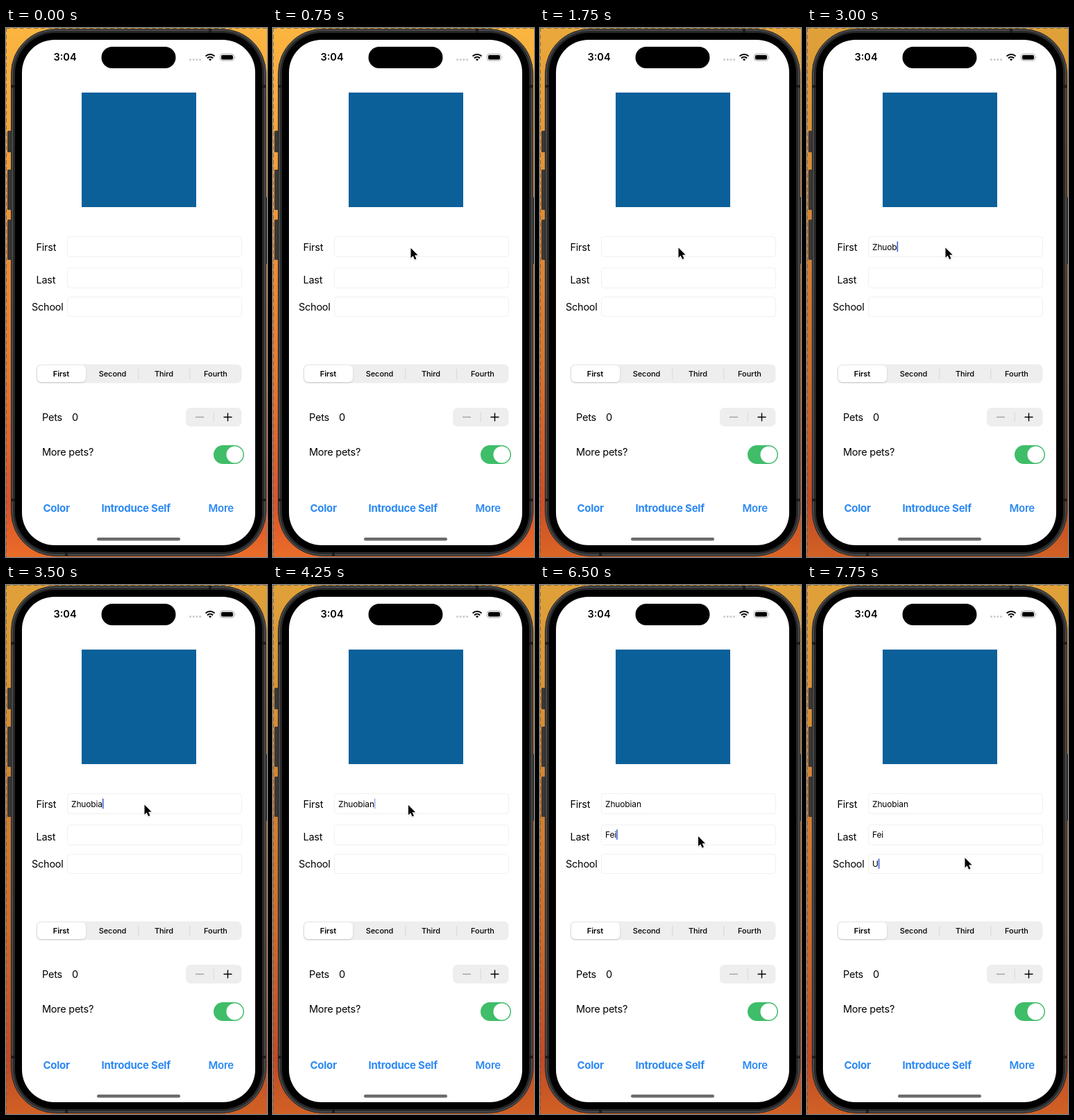
Recreate the animation shown at these times as an HTML page. Size 376 by 762 pixels, loop 8 s.

```html
<!DOCTYPE html>
<html lang="en">
<head>
<meta charset="utf-8">
<title>Phone form</title>
<style>
html, body { margin: 0; width: 100%; height: 100%; overflow: hidden; background: #000; }
svg { display: block; width: 376px; height: 762px; }
text { font-family: Inter, Roboto, sans-serif; font-size: 14.5px; letter-spacing: -.25px; fill: #000; }
.entry { font-size: 12px; letter-spacing: -.15px; }
.tab { font-size: 11px; font-weight: 500; letter-spacing: -.05px; text-anchor: middle; }
.link { font-size: 15px; font-weight: 700; fill: #2c89f3; }
.field { fill: #fff; stroke: #f0f0f0; }
.tray { fill: #eeeeef; }
.split { stroke: #d7d7d9; }
#dim { animation: dim 8s linear infinite; }
@keyframes dim {
  0%, 16% { opacity: 0; }
  26%, 100% { opacity: .11; }
}
</style>
</head>
<body>
<svg viewBox="0 0 376 762">
  <defs>
    <linearGradient id="sky" x2="0" y2="1">
      <stop offset="0" stop-color="#fbb540"/>
      <stop offset=".3" stop-color="#ee9a3c"/>
      <stop offset=".65" stop-color="#e47a31"/>
      <stop offset=".9" stop-color="#d9532a"/>
      <stop offset="1" stop-color="#ea6d29"/>
    </linearGradient>
    <filter id="soft" x="-20%" y="-20%" width="140%" height="150%">
      <feDropShadow dx="0" dy="1" stdDeviation="1.2" flood-opacity=".18"/>
    </filter>
  </defs>

  <rect width="376" height="762" fill="url(#sky)"/>
  <rect id="dim" width="376" height="762"/>
  <path d="M0 .5H376M.5 0V762" fill="none" stroke="#54483c" stroke-opacity=".6" stroke-dasharray="6 4"/>

  <!-- case -->
  <g fill="#3b3836">
    <rect x="2" y="148" width="7" height="31" rx="1.5"/>
    <rect x="2" y="204" width="7" height="58" rx="1.5"/>
    <rect x="2" y="276" width="7" height="58" rx="1.5"/>
    <rect x="372" y="243" width="4" height="97" rx="1.5"/>
  </g>
  <rect x="7.5" y="1.5" width="367" height="759" rx="64" fill="#4a4a4b" stroke="#222"/>
  <rect x="10" y="4" width="362" height="754" rx="61" fill="#29292a"/>
  <path d="M8 84h5M369 84h5M8 680h5M369 680h5M294 2v5M87 755v5" stroke="#1b1b1c" stroke-width="4"/>
  <rect x="13" y="7" width="356" height="748" rx="58" fill="#000"/>
  <rect x="23" y="17" width="336" height="728" rx="47" fill="#fff"/>

  <!-- status bar -->
  <text x="68.5" y="47" style="font-size:14.5px;font-weight:600;letter-spacing:0">3:04</text>
  <rect x="137.5" y="27" width="107" height="31" rx="15.5"/>
  <path d="M265.5 45.5h15" stroke="#c9c9cb" stroke-width="3" stroke-linecap="round" stroke-dasharray="0 4.7"/>
  <g fill="none" stroke="#000" stroke-width="2">
    <path d="M287.6 40.6a9.2 9.2 0 0 1 13 0M290 43.4a6 6 0 0 1 8.2 0"/>
    <path d="M292 45l2.1 2.4 2.1-2.4q-2.1-1.4-4.2 0z" fill="#000" stroke="none"/>
  </g>
  <rect x="308.5" y="37.5" width="20" height="9.5" rx="3" fill="none" stroke="#a5a5a7"/>
  <rect x="310" y="39" width="17" height="6.5" rx="1.8"/>
  <path d="M330 40.5q1.6 1.7 0 3.5z" fill="#a5a5a7"/>

  <rect x="109" y="93" width="165" height="165" fill="#0b609a"/>

  <!-- form -->
  <text x="43.5" y="321">First</text>
  <text x="43.5" y="368">Last</text>
  <text x="37" y="407">School</text>
  <rect class="field" x="88.5" y="300.5" width="251" height="29" rx="4"/>
  <rect class="field" x="88.5" y="345.5" width="251" height="29" rx="4"/>
  <rect class="field" x="88.5" y="387.5" width="251" height="28" rx="4"/>
  <text class="entry" x="94" y="319.5"></text>
  <text class="entry" x="94" y="364"></text>
  <text class="entry" x="94" y="406"></text>
  <rect id="caret" width="1.6" height="15" rx=".8" fill="#3c5fd8"/>

  <!-- tabs -->
  <rect class="tray" x="43.5" y="484.5" width="296" height="27" rx="7"/>
  <path class="split" d="M190.8 491v15M264.8 491v15"/>
  <rect x="45" y="486" width="70" height="24" rx="6" fill="#fff" filter="url(#soft)"/>
  <text class="tab" x="79.5" y="502" style="font-weight:600">First</text>
  <text class="tab" x="153.5" y="502">Second</text>
  <text class="tab" x="227.5" y="502">Third</text>
  <text class="tab" x="302" y="502">Fourth</text>

  <!-- stepper and switch -->
  <text x="52" y="566">Pets</text>
  <text x="95" y="566">0</text>
  <rect class="tray" x="259" y="547" width="80.5" height="27" rx="7"/>
  <path class="split" d="M299.3 553v15"/>
  <path d="M273 560.5h12" stroke="#a0a0a2" stroke-width="1.4"/>
  <path d="M313.5 560.5h12M319.5 554.5v12" stroke="#000" stroke-width="1.4"/>
  <text x="52" y="616">More pets?</text>
  <rect x="299" y="601" width="44" height="27" rx="13.5" fill="#3fbd69"/>
  <circle cx="329.5" cy="614.5" r="12" fill="#fff"/>

  <!-- links -->
  <text class="link" x="53.5" y="697">Color</text>
  <text class="link" x="137.5" y="697">Introduce Self</text>
  <text class="link" x="291.5" y="697" style="font-weight:600">More</text>
  <rect x="131" y="734" width="120" height="4.4" rx="2.2" fill="#6c6c6e"/>

  <path id="pointer" d="M0 0V14.2L3.2 11.2L5.6 16.6L8 15.5L5.6 10.3H10.1Z" stroke="#fff" stroke-width="1.1" stroke-linejoin="round" paint-order="stroke" filter="url(#soft)"/>
</svg>
<script>
const LOOP = 8000, STEP = 250;
const words = ["Zhuobian", "Fei", "U"];
// Per field: the time at which each letter count begins.
const typing = [
  [[2750, 2], [3000, 5], [3250, 6], [3500, 7], [3750, 8]],
  [[5500, 1], [5750, 2], [6000, 3]],
  [[7750, 1]]
];
// Time, focused field, caret opacity.
const focus = [[0, 0, 0], [2250, 0, 1], [4250, 0, .5], [4750, 1, 1], [7000, 2, 1]];
// Time, pointer tip.
const moves = [
  [0, -40, 0], [500, 208, 345], [750, 198.5, 317], [1500, 199.5, 316.5], [4250, 195, 317],
  [4500, 203, 336], [4750, 208.5, 349.5], [6250, 224, 332], [6500, 228, 362],
  [6750, 231, 403], [7000, 227.5, 393]
];

const entries = document.querySelectorAll(".entry");
const caret = document.getElementById("caret");
const pointer = document.getElementById("pointer");
const at = (list, t) => list.filter(row => row[0] <= t).pop();

function draw(t) {
  entries.forEach((entry, i) => {
    const text = words[i].slice(0, (at(typing[i], t) || [0, 0])[1]);
    if (entry.textContent !== text) entry.textContent = text;
  });
  const [, field, opacity] = at(focus, t);
  const entry = entries[field];
  caret.setAttribute("x", 94 + (entry.textContent ? entry.getComputedTextLength() : 0));
  caret.setAttribute("y", entry.getAttribute("y") - 12);
  caret.setAttribute("opacity", opacity);
  const [, x, y] = at(moves, t);
  pointer.setAttribute("transform", `translate(${x} ${y})`);
}

function tick() {
  const t = performance.now() % LOOP;
  draw(Math.floor(t / STEP) * STEP);
  requestAnimationFrame(tick);
}
tick();
</script>
</body>
</html>
```
